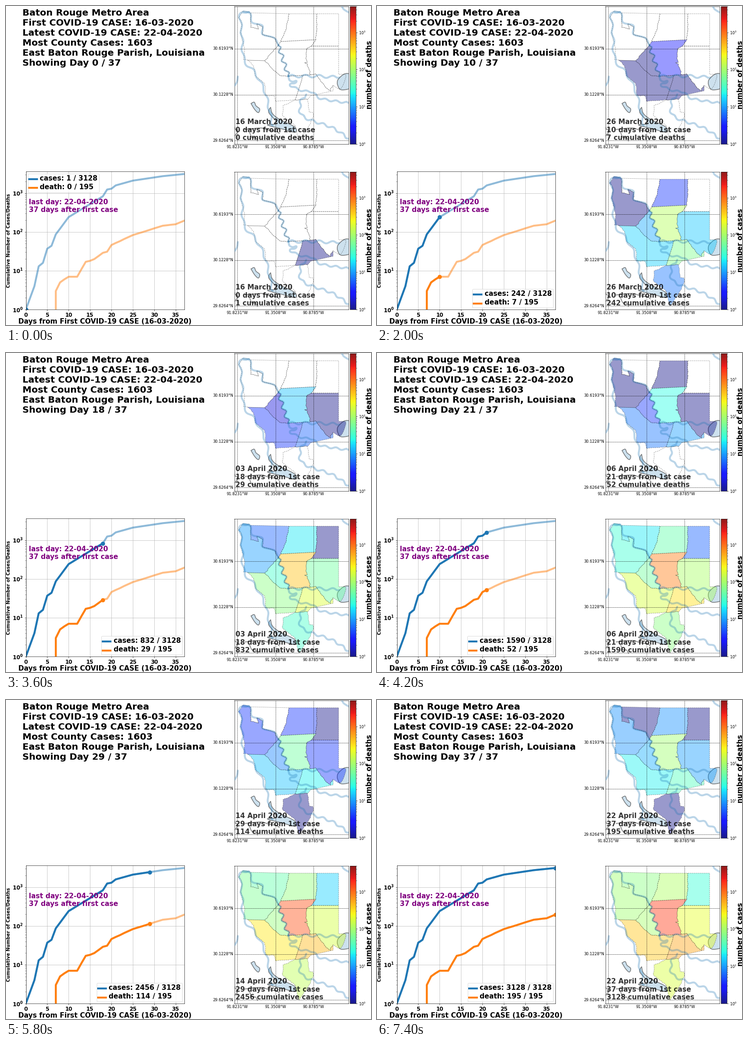
A matplotlib script for the animation above (7.6 s loop, 800 px wide and 700 px high).

```python
import numpy as np
import matplotlib.pyplot as plt
from matplotlib.animation import FuncAnimation
from matplotlib.colors import ListedColormap
from matplotlib.patches import Polygon

W, H = 800, 700
S = 0.6            # point scale
LAST = 37
VMAX = 5000
BLUE, ORANGE = "#1f77b4", "#ff7f0e"

plt.rcParams.update({"font.family": "DejaVu Sans", "axes.linewidth": 0.8 * S})
for axis in ("xtick", "ytick"):
    for kind, size, width in (("major", 3.5, 0.8), ("minor", 2, 0.6)):
        plt.rcParams.update({f"{axis}.{kind}.size": size * S,
                             f"{axis}.{kind}.width": width * S,
                             f"{axis}.{kind}.pad": 3.5 * S})

# ------------------------------------------------------------------- counts
days = np.arange(LAST + 1)


def growth(*knots):
    """Daily totals, exponential between (day, total) knots, zero before."""
    x, y = zip(*knots)
    total = np.rint(np.exp(np.interp(days, x, np.log(y)))).astype(int)
    return np.where(days < x[0], 0, total)


cases = growth((0, 1), (2, 4), (3, 13), (4, 16), (5, 37), (6, 44), (7, 87),
               (10, 242), (18, 832), (19, 1245), (20, 1305), (21, 1590),
               (25, 2111), (32, 2751), (37, 3128))
deaths = growth((7, 3), (8, 5), (10, 7), (12, 7), (14, 17), (16, 20), (18, 29),
                (19, 31), (20, 46), (25, 83), (32, 145), (35, 158), (37, 195))

# Parish: (final count, lag); a larger lag means a later start
CASE_RULE = dict(ebr=(1603, 1.02), asc=(560, 0.85), ib=(400, 1.27),
                 wbr=(100, 0.87), liv=(210, 1.04), pc=(95, 1.7), wf=(75, 1.97),
                 ef=(110, 1.3), sh=(28, 2.3), asm=(175, 1.25))
DEATH_RULE = dict(ebr=(93, 1), asc=(38, 0.98), ib=(22, 0.85), wbr=(12, 0.85),
                  liv=(10, 1.55), pc=(9, 1.75), wf=(1, 5), ef=(9, 1.75),
                  sh=(1, 1), asm=(1, 0.75))


def fill(progress, final, lag):
    value = round(final * progress ** lag)
    if value < 1:
        return (0, 0, 0, 0)
    return plt.cm.jet(np.log(value) / np.log(VMAX), alpha=0.4)


# ---------------------------------------------------------------- geography
rng = np.random.default_rng(4)


def resample(points, step):
    p = np.array(points, float)
    s = np.r_[0, np.cumsum(np.hypot(*np.diff(p, axis=0).T))]
    t = np.linspace(0, s[-1], max(2, int(s[-1] / step) + 1))
    t = np.union1d(t, s)
    return np.c_[np.interp(t, s, p[:, 0]), np.interp(t, s, p[:, 1])], t


def rough(*points, amp=0.8):
    """Border with seeded jagged steps and fixed ends."""
    p, _ = resample(points, 4)
    p[1:-1] += rng.normal(0, amp, p[1:-1].shape)
    return p


def smooth(*points, n=8):
    """Catmull-Rom curve through the points."""
    p = np.array([points[0], *points, points[-1]], float)
    t = np.linspace(0, 1, n, endpoint=False)[:, None]
    parts = [0.5 * (2 * b + (c - a) * t + (2 * a - 5 * b + 4 * c - d) * t**2
                    + (3 * b - a - 3 * c + d) * t**3)
             for a, b, c, d in zip(p, p[1:], p[2:], p[3:])]
    return np.vstack(parts + [p[-1:]])


def meander(*points, amp=2.5, length=24):
    """Smooth course with a sideways sine, fading out at both ends."""
    p, s = resample(smooth(*points), 2)
    d = np.gradient(p, axis=0)
    normal = np.c_[d[:, 1], -d[:, 0]] / np.hypot(*d.T)[:, None]
    fade = np.clip(np.minimum(s, s[-1] - s) / 6, 0, 1)
    return p + normal * (amp * fade * np.sin(2 * np.pi * s / length))[:, None]


# Corners where parishes meet
NW, N1, N2, NE = (536, 15), (621, 17), (681, 17), (729, 17)
A, B, C, D = (597, 86), (602, 78), (679, 74), (669, 88)
E, F, G, J = (567, 120), (619, 154), (650, 152), (668, 151)
K, L, M, Q = (530, 119), (634, 206), (661, 205), (717, 174)
LE = (729, 88)

pc_wf = rough(NW, (537, 46), (553, 51), (550, 39), (563, 46), (562, 62),
              (588, 70), A, amp=0.4)
wf_ef = rough(N1, (614, 50), B, amp=0.5)
ef_sh = rough(N2, (680, 55), C)
sh_ebr = rough(C, D)
ebr_liv = rough(D, (658, 95), (658, 125), J, amp=1.2)
ebr_wbr = meander(A, F, amp=4, length=20)
wbr_pc = rough(A, E)
wbr_ib = rough(E, (583, 137), (601, 153), F, amp=0.4)
asc_liv = rough(J, (679, 150), (698, 176), (709, 186), Q)
ib_asc = rough(G, (648, 163), L, amp=0)
asc_asm = rough(L, M)
ef_ebr = np.array([B, (640, 76), C])
pc_west = rough(K, (521, 118), (523, 93), (514, 60), (517, 40), (511, 25),
                (520, 11), NW, amp=0.6)
ib_west = rough(K, (543, 132), (546, 152), (567, 170), (570, 197), (589, 198),
                (590, 209), L, amp=0.5)
asm_rest = rough(M, (665, 233), (673, 234), (673, 244), (660, 270), (642, 296),
                 (634, 263), (606, 240), (608, 218), L, amp=0.5)
lake_shore = smooth(Q, (730, 182), (737, 177), (743, 162), (744, 151), (729, 150))

PARISHES = dict(
    pc=(pc_west, pc_wf, wbr_pc, [K]),
    wf=([N1], wf_ef, [A], pc_wf[::-1]),
    ef=(wf_ef, ef_ebr, ef_sh[::-1]),
    sh=(ef_sh, sh_ebr, [LE, NE]),
    ebr=(ef_ebr, sh_ebr, ebr_liv, [G], ebr_wbr[::-1]),
    wbr=(ebr_wbr, wbr_ib[::-1], wbr_pc[::-1]),
    ib=([E], wbr_ib, ib_asc, ib_west[::-1]),
    asc=([G], asc_liv, [(717, 186), (668, 197)], asc_asm[::-1], ib_asc[::-1]),
    liv=(ebr_liv, asc_liv, lake_shore, [LE]),
    asm=(asc_asm, asm_rest),
)
RIVERS = [
    meander((533, 13), (514, 17), (517, 60), (522, 118), (545, 146), (568, 190),
            (584, 262), length=36),
    smooth((520, 12), (536, 17), (539, 36), (562, 43), (562, 62), (588, 70), A),
    ebr_wbr,
    meander(F, (620, 163), (636, 165), (624, 174), (650, 186), (672, 189),
            (690, 203), (752, 213), amp=2),
    meander(F, (683, 154), (730, 157), amp=3, length=30),
    meander((658, 194), (645, 213), (652, 243), (715, 267), (752, 292)),
    smooth((735, -3), (740, 7), (753, 15)),
    smooth((508, 155), (506, 167), (499, 177)),
]
LAKES = [
    smooth((726, 171), (728, 161), (742, 149), (755, 152), (755, 178), (741, 184),
           (731, 182), (726, 171)),
    smooth((537, 214), (544, 211), (548, 219), (556, 226), (553, 234), (545, 227),
           (537, 214)),
    smooth((580, 222), (584, 236), (600, 249), (632, 265), (634, 277), (606, 270),
           (573, 261), (594, 257), (576, 234), (580, 222)),
]
COASTS = [smooth(*(np.array(start) + np.cumsum(rng.normal((dx, 3), 4, (6, 2)), 0)))
          for start, dx in (((499, 262), 3), ((512, 266), 12), ((538, 276), 6))]

# ------------------------------------------------------------------ drawing
fig = plt.figure(figsize=(8, 7), dpi=100, facecolor="white")


def px_axes(x0, y0, x1, y1):
    return fig.add_axes([x0 / W, 1 - y1 / H, (x1 - x0) / W, (y1 - y0) / H])


def px_text(x, y, s, size, **kw):
    """Text in pixels; y is the baseline of the last line."""
    kw = dict(weight="bold", va="baseline") | kw
    return fig.text(x / W, 1 - y / H, s, fontsize=size * S, **kw)


def draw_map(dy, label):
    ax = px_axes(500.5, 0.5 + dy, 750.5, 302.5 + dy)
    ax.set(xlim=(500.5, 750.5), ylim=(302.5, 0.5), xticks=[], yticks=[])
    shapes = {name: ax.add_patch(Polygon(np.vstack(arcs), fc="none", ls="--",
                                         ec=(0, 0, 0, 0.4), lw=S, zorder=2))
              for name, arcs in PARISHES.items()}
    for pts in RIVERS:
        ax.plot(*pts.T, color=BLUE, alpha=0.3, lw=5 * S, zorder=3,
                solid_capstyle="round")
    for pts in LAKES:
        ax.add_patch(Polygon(pts, fc=(0.12, 0.47, 0.71, 0.22),
                             ec=(0.2, 0.2, 0.2, 0.6), lw=2 * S, zorder=1.5))
    for pts in COASTS:
        ax.plot(*pts.T, color="black", alpha=0.5, lw=2 * S, zorder=1.5)

    dots = dict(color="black", lw=S, ls=(0, (1, 1)), zorder=4)
    plain = dict(weight="normal", va="center")
    for i in range(3):
        y, x = 94 + 100.7 * i, 507 + 83.5 * i
        ax.axhline(y, **dots)
        ax.axvline(x, **dots)
        px_text(498, y + dy, f"{30.6193 - 0.49645 * i:.4f}°N", 10, ha="right", **plain)
        px_text(x, 310 + dy, f"{91.8231 - 0.4723 * i:.4f}°W", 10, ha="center", **plain)

    bar = px_axes(753.5, 0.5 + dy, 767, 302.5 + dy)
    ramp = ListedColormap(plt.cm.jet(np.linspace(0, 1, 256)) * 0.9 + 0.1)
    bar.pcolormesh([0, 1], np.geomspace(1, VMAX, 257),
                   np.arange(256)[:, None], cmap=ramp)
    bar.set_yscale("log")
    bar.set(xlim=(0, 1), ylim=(1, VMAX), xticks=[])
    bar.yaxis.tick_right()
    bar.tick_params(labelsize=10 * S)
    px_text(801, 151 + dy, label, 18, rotation=90, rotation_mode="anchor",
            ha="center")
    return shapes, px_text(503, 294 + dy, "", 18, color="black", alpha=0.8)


death_map, death_note = draw_map(0, "number of deaths")
case_map, case_note = draw_map(363, "number of cases")

HEADER = """Baton Rouge Metro Area
First COVID-19 CASE: 16-03-2020
Latest COVID-19 CASE: 22-04-2020
Most County Cases: 1603
East Baton Rouge Parish, Louisiana
Showing Day {} / {}"""
title = px_text(35.6, 131, "", 24)

plot = px_axes(43.5, 363.5, 390.5, 666)
plot.set_yscale("log")
plot.set(xlim=(0, LAST), ylim=(1, 1.15 * cases[-1]), xticks=range(0, 36, 5))
plot.grid(color="#b0b0b0", lw=0.8 * S)
plot.tick_params(labelsize=14 * S)
for tick in plot.get_xticklabels() + plot.get_yticklabels():
    tick.set_fontweight("bold")
series = []
for data, color in ((cases, BLUE), (deaths, ORANGE)):
    plot.plot(days, data, color=color, alpha=0.5, lw=5 * S)
    line, = plot.plot([], [], color=color, lw=5 * S)
    dot, = plot.plot([], [], "o", color=color, ms=10 * S, mew=S)
    series.append((data, line, dot))
px_text(217, 697, "Days from First COVID-19 CASE (16-03-2020)", 18, ha="center")
px_text(9, 514.5, "Cumulative Number of Cases/Deaths", 12, rotation=90,
        rotation_mode="anchor", ha="center")
px_text(50, 452, "last day: 22-04-2020\n37 days after first case", 18, color="purple")


def update(day):
    title.set_text(HEADER.format(day, LAST))
    date = f"{16 + day} March 2020" if day < 16 else f"{day - 15:02d} April 2020"
    for shapes, note, data, rule, what in (
            (death_map, death_note, deaths, DEATH_RULE, "deaths"),
            (case_map, case_note, cases, CASE_RULE, "cases")):
        note.set_text(f"{date}\n{day} days from 1st case\n"
                      f"{data[day]} cumulative {what}")
        for name, patch in shapes.items():
            patch.set_facecolor(fill(data[day] / data[-1], *rule[name]))
    for data, line, dot in series:
        line.set_data(days[:day + 1], data[:day + 1])
        dot.set_data([day], [data[day]])
    legend = plot.legend([line for _, line, _ in series],
                         [f"{what}: {data[day]} / {data[-1]}"
                          for what, data in (("cases", cases), ("death", deaths))],
                         loc="upper left" if cases[day] < 100 else "lower right",
                         fontsize=10 * S)
    legend.get_frame().set_linewidth(S)
    for text in legend.get_texts():
        text.set(fontsize=18 * S, fontweight="bold")


anim = FuncAnimation(fig, update, frames=LAST + 1, interval=200,
                     init_func=lambda: update(0), repeat=True, repeat_delay=0)
plt.show()
```
